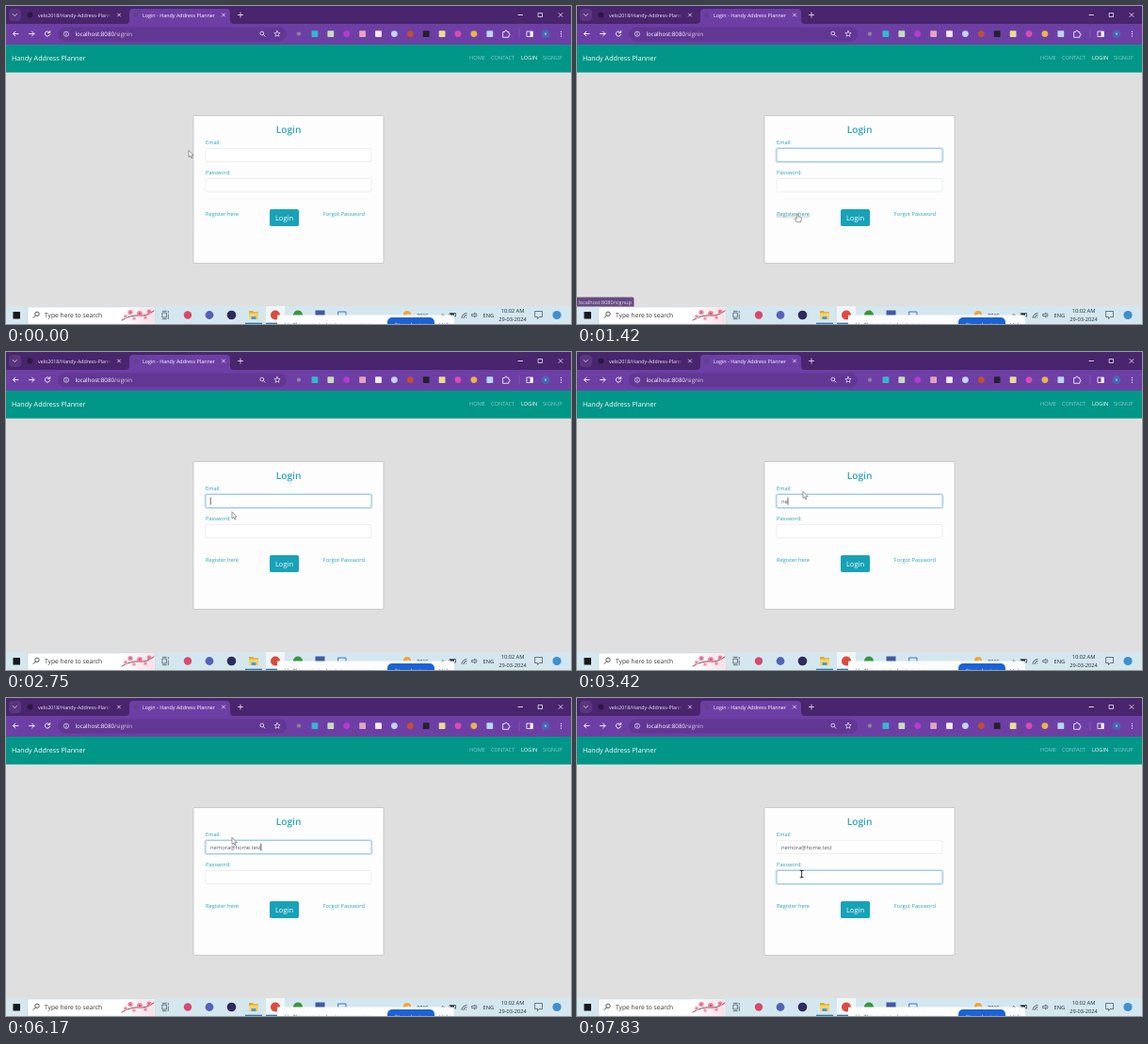
Recreate the animation shown at these times as an HTML page. Size 600 px wide and 338 px high, loop 8 s.

```html
<!DOCTYPE html>
<html lang="en">
<head>
<meta charset="utf-8">
<title>Login</title>
<style>
html, body { margin: 0; width: 100%; height: 100%; overflow: hidden; background: #e0dfdf; }
svg { display: block; width: 600px; height: 338px; overflow: hidden; }
text { font-family: "Open Sans", "Noto Sans", sans-serif; text-rendering: geometricPrecision; white-space: pre; }
.line { fill: none; stroke-linecap: round; stroke-linejoin: round; }
</style>
</head>
<body>
<svg id="stage" viewBox="0 0 600 338" xmlns="http://www.w3.org/2000/svg">
  <defs>
    <linearGradient id="fade" x1="0" x2="1">
      <stop offset="0" stop-color="#48256c" stop-opacity="0"/>
      <stop offset="1" stop-color="#48256c"/>
    </linearGradient>
    <linearGradient id="sky" x1="0" x2="1">
      <stop offset="0" stop-color="#fff"/>
      <stop offset="1" stop-color="#f6dfe6"/>
    </linearGradient>
    <clipPath id="tabClip"><rect x="34" y="2" width="78" height="15"/></clipPath>
    <clipPath id="titleClip"><rect x="144" y="2" width="82" height="15"/></clipPath>
  </defs>
  <g id="browser"></g>
  <g id="page"></g>
  <g id="taskbar"></g>
  <g id="status">
    <path d="M0 309.500H59q1.500 0 1.500 1.500V319.500H0Z" fill="#664a80"/>
    <text x="1.500" y="316.500" font-size="5.500" fill="#e6dcee">localhost:8080/signup</text>
  </g>
  <g id="pointer">
    <path id="arrow" d="M0 0V7.200L1.700 5.700L2.900 8.300L4 7.800L2.900 5.300H5.200Z" fill="#fff" stroke="#555" stroke-width=".6" stroke-linejoin="round"/>
    <path id="hand" d="M-.8 .6Q0 -.5 .8 .6V3.300L3.300 3.900Q4.500 4.200 4.400 5.600L3.600 9.200H-.6L-2.900 5.900Q-2.700 4.800 -1.700 5.300L-.8 6.100Z" fill="#fff" stroke="#555" stroke-width=".6" stroke-linejoin="round"/>
    <path id="beam" class="line" d="M-1.500 -3.600H1.500M0 -3.600V3.600M-1.500 3.600H1.500" stroke="#222" stroke-width=".9"/>
  </g>
</svg>
<script>
const $ = id => document.getElementById(id);
const rect = (x, y, w, h, fill, r = 0, extra = '') =>
  `<rect x="${x}" y="${y}" width="${w}" height="${h}" rx="${r}" fill="${fill}" ${extra}/>`;
const dot = (x, y, r, fill, extra = '') =>
  `<circle cx="${x}" cy="${y}" r="${r}" fill="${fill}" ${extra}/>`;
const line = (d, color, w = 0.8, extra = '') =>
  `<path class="line" d="${d}" stroke="${color}" stroke-width="${w}" ${extra}/>`;
const label = (x, y, size, fill, str, extra = '') =>
  `<text x="${x}" y="${y}" font-size="${size}" fill="${fill}" ${extra}>${str}</text>`;

const APP = 'Handy Address Planner';
const EMAIL = 'nemora@home.test';
const TEAL = '#2ba5b9', BUTTON = '#17a2b8', HOVER = '#3f8d9d';
const PALE = '#f1e8f8', INK = '#222c33', STRIP = '#48256c', BAR = '#6d3fa5';

function browser() {
  const cross = (x, y, s) => line(`M${x - s} ${y - s}l${2 * s} ${2 * s}m0 ${-2 * s}l${-2 * s} ${2 * s}`, PALE);
  const tools = ['#8d8299', '#35b7cf', '#c6dcb9', '#b43ccf', '#e5a4bd', '#f2e9ec', '#c4d3ee',
    '#c2502f', '#26212b', '#e9dc92', '#d94bb4', '#e9b44a', '#b9d6f2'];
  const square = [1, 2, 4, 5, 8, 9, 12];
  let s = rect(0, 0, 600, 20, STRIP) + rect(0, 19, 600, 22, BAR);
  s += rect(3, 3, 13, 13, '#5a3580', 4) + line('M7.300 8.600l2 2l2-2', PALE);
  s += dot(25.5, 9.5, 3, '#2c1840');
  s += label(34, 11.5, 5.3, PALE, 'velo2018/' + APP.replaceAll(' ', '-'), 'clip-path="url(#tabClip)"');
  s += rect(104, 3, 8, 14, 'url(#fade)') + cross(120, 9.5, 1.5);
  s += `<path d="M127 19q4 0 4-4V7q0-4 4-4h99q4 0 4 4v8q0 4 4 4Z" fill="${BAR}"/>`;
  s += dot(138, 9.5, 2.4, '#5d4484');
  s += label(145, 11.5, 5.4, '#fff', 'Login - ' + APP, 'clip-path="url(#titleClip)"');
  s += cross(231, 9.5, 1.5) + line('M246.500 9.500h5m-2.500-2.500v5', PALE);
  s += line('M544 9.500h4.500', '#fff') + line('M565.500 7.500h4v4h-4Z', '#fff', 0.7) + cross(589, 9.5, 2);

  s += line('M13 29.500H7.500m2.400-2.400l-2.400 2.400l2.400 2.400', '#fff', 0.9);
  s += line('M24.500 29.500H30m-2.400-2.400l2.400 2.400l-2.400 2.400', '#fff', 0.9);
  s += line('M46.300 28.300a2.600 2.600 0 1 0 .2 2M46.700 26.500v2h-2', '#fff', 0.9);
  s += rect(55, 22.5, 243, 15, '#613793', 7.5);
  s += dot(64, 29.7, 2.6, 'none', `stroke="${PALE}" stroke-width=".7"`) + line('M64 29.500v1.500M64 28.200v.1', PALE, 0.7);
  s += label(73.500, 31.900, 6.15, '#fff', 'localhost:8080<tspan fill="#dccbea">/signin</tspan>');
  s += dot(271.8, 29, 1.9, 'none', `stroke="${PALE}" stroke-width=".8"`) + line('M273.300 30.500l1.700 1.700', PALE);
  let star = '';
  for (let i = 0; i < 10; i++) {
    const r = i % 2 ? 1.5 : 3.3, a = i * Math.PI / 5;
    star += (i ? 'L' : 'M') + (288 + r * Math.sin(a)).toFixed(2) + ' ' + (29.6 - r * Math.cos(a)).toFixed(2);
  }
  s += line(star + 'Z', PALE, 0.7);
  tools.forEach((c, i) => {
    const x = 311 + i * 16.9;
    s += square.includes(i) ? rect(x - 3.4, 26.2, 6.8, 6.8, c, 0.8) : dot(x, 29.6, i ? 3.4 : 2.2, c);
  });
  s += line('M528 27.500h1.700q0-1.500 1.300-1.500t1.300 1.500h1.500v1.700q1.300 0 1.300 1.200t-1.300 1.200v1.700h-5.800Z', '#fff', 0.8);
  s += line('M545 25v9', '#8f65b6', 0.6);
  s += line('M553.300 27h6v5.500h-6Z', '#fff') + rect(556.6, 27, 2.7, 5.5, '#fff');
  s += dot(573, 29.7, 4.4, '#4568b0') + label(573, 31.3, 5, '#fff', 'v', 'text-anchor="middle"');
  for (const y of [27.3, 29.7, 32.1]) s += dot(589.5, y, 0.65, '#fff');
  return s;
}

function page() {
  const input = (id, y) =>
    rect(211.2, y - 0.8, 177.6, 15.6, 'none', 2, `id="${id}Ring" stroke="#d3e6f8" stroke-width="1.400"`) +
    rect(212, y, 176, 14, '#fff', 1.4, 'stroke="#dadee2" stroke-width=".5"') +
    rect(212, y, 176, 14, 'none', 1.4, `id="${id}Edge" stroke="#8fc2e8" stroke-width=".8"`);
  let s = rect(0, 41, 600, 30, '#009688') + rect(0, 70.6, 600, 249, '#e0dfdf');
  s += label(6, 57.700, 7.2, '#fff', APP, 'font-weight="500"');
  [[492, 'HOME'], [515, 'CONTACT'], [547, 'LOGIN'], [570, 'SIGNUP']].forEach(([x, w]) => {
    s += label(x, 57.200, 5.7, w === 'LOGIN' ? '#fff' : '#88cfc7', w);
  });
  s += rect(199, 116.4, 202, 157, '#fdfdfd', 0.8, 'stroke="#b8b8b8" stroke-width=".7"');
  s += label(300, 134.800, 10.2, TEAL, 'Login', 'text-anchor="middle" font-weight="600"');
  s += label(212, 146.600, 5.65, TEAL, 'Email:') + input('email', 151.5);
  s += label(212, 179, 5.65, TEAL, 'Password:') + input('pass', 183.5);
  s += label(217, 160.700, 5.8, '#555d64', '', 'id="typed"');
  s += rect(217, 154.5, 0.7, 8, '#222', 0, 'id="caret"');
  s += label(212, 223, 5.7, TEAL, 'Register here', 'id="link"');
  s += line('M212 224h35', HOVER, 0.4, 'id="under"');
  s += label(336.800, 223, 5.7, TEAL, 'Forgot Password');
  s += rect(280, 216, 31, 18, BUTTON, 1.8);
  s += label(295.5, 228, 7.5, '#fff', 'Login', 'text-anchor="middle"');
  return s;
}

function taskbar() {
  let s = rect(0, 319, 600, 19, '#d5e7ee');
  s += rect(7.5, 325, 7.5, 7.5, '#15191c');
  s += rect(23, 320, 135, 18, '#fff', 0, 'stroke="#c3cdd2" stroke-width=".5"');
  s += dot(33, 327.3, 2.2, 'none', `stroke="${INK}" stroke-width=".8"`) + line('M31.400 329l-2.400 2.500', INK);
  s += label(41, 331.200, 6.7, '#333', 'Type here to search');
  // blossom picture in the search box
  s += rect(122, 320.5, 35.5, 17, 'url(#sky)') + line('M123 334q10-6 18-5t16-5', '#80515a', 1);
  [[127, 330, 2.2], [132, 325.5, 2.6], [136, 332, 2], [142, 327, 3], [148, 331, 2.2], [152, 325, 2.4]].forEach(([x, y, r], i) => {
    s += dot(x, y, r, i % 2 ? '#e98aa5' : '#f2b4c4') + dot(x, y, r * 0.3, '#b93e5f');
  });
  s += line('M166.300 326h4v5h-4ZM166.300 324.300h4M166.300 332.700h4M172.300 324.500v1.500M172.300 328v4.500', INK, 0.6);
  s += dot(193, 328.5, 4.2, '#d8496d') + dot(216, 328.5, 4.4, '#5263b8') + dot(239.5, 328.5, 4.8, '#30295c');
  s += '<path d="M258 324h4l1 1.300h5v7.700h-10Z" fill="#e5a92e"/>' + rect(258, 326.5, 10, 6.5, '#f8d366', 0.5) + rect(260.5, 330, 5, 3, '#4a9bd5');
  s += rect(276, 319, 20, 19, '#f0f6f8') + dot(286, 328.5, 5, '#dd4b3e');
  s += rect(254, 336.7, 18, 1.3, '#2a78b8') + rect(276, 336.7, 20, 1.3, '#2a78b8');
  s += dot(310, 328.5, 5, '#3b963f') + rect(328.5, 323.5, 10, 10, '#4259a0');
  s += line('M353 325h8v8h-8Z', '#3c78c6', 1);
  s += dot(426, 328, 4, '#f2a436') + '<path d="M422 331q0-2.500 3-2.500q3-2.500 4.500 .6q2.500 .2 2.500 1.900Z" fill="#e9eef0"/>';
  s += label(436, 330.800, 5.7, INK, '30°C');
  s += line('M462 329.500l2-2l2 2', INK) + line('M471.500 326.500h6v3.500h-6Z', INK, 0.7) + rect(472, 327, 4, 2.6, INK);
  s += line('M484 331.500a5 5 0 0 1 5-5M486 331.500a3 3 0 0 1 3-3M488.500 331v.2', INK, 0.7);
  s += line('M495 327.500h1.300l1.700-1.500v5l-1.700-1.500h-1.300ZM499.500 327q1.200 1.500 0 3', INK, 0.6);
  s += label(506.500, 330.800, 5.7, INK, 'ENG');
  s += label(538, 325.900, 5.7, INK, '10:02 AM', 'text-anchor="middle"');
  s += label(538, 335.200, 5.7, INK, '29-03-2024', 'text-anchor="middle"');
  s += line('M562 324.500h7.500v6h-3l-2 2v-2h-2.500Z', INK, 0.6) + dot(585, 328.5, 4.6, '#3f8fd0');
  // screen sharing notice, cut off by the stage edge
  s += rect(288, 328.5, 188, 14, '#fdfdfd', 1) + label(295, 341.300, 5.8, '#555', '||  This page is sharing your screen.');
  s += rect(405, 331, 50, 14, '#1a62d6', 5) + label(430, 341.200, 5.8, '#fff', 'Stop sharing', 'text-anchor="middle"');
  s += label(460, 341.200, 5.8, '#1a62d6', 'Hide');
  return s;
}

$('browser').innerHTML = browser();
$('page').innerHTML = page();
$('taskbar').innerHTML = taskbar();

const LOOP = 8000, BLINK = 480;
const EMAIL_CLICK = 500, PASS_CLICK = 7345;
const KEYS = [3250, 3415, 3580, 3830, 4000, 4165, 4580, 4910, 5000, 5165, 5415, 5500, 5600, 5740, 5830, 5990];
// time, x, y
const PATH = [
  [80, 194, 153.5], [420, 232, 158], [560, 232, 158], [830, 234, 220.5], [1670, 234, 220.5],
  [2080, 240, 182], [2580, 240, 182], [3000, 240, 148.3], [6580, 240, 148.3], [7250, 238.6, 187]
];

function pointerAt(t) {
  const i = PATH.findIndex(p => p[0] > t);
  if (i === 0) return PATH[0].slice(1);
  if (i < 0) return PATH.at(-1).slice(1);
  const a = PATH[i - 1], b = PATH[i];
  const u = (t - a[0]) / (b[0] - a[0]), e = u * u * (3 - 2 * u);
  return [a[1] + (b[1] - a[1]) * e, a[2] + (b[2] - a[2]) * e];
}

const show = (id, on) => $(id).setAttribute('opacity', +on);
const ramp = (t, start, len) => Math.min(1, Math.max(0, (t - start) / len));

function draw(t) {
  const [x, y] = pointerAt(t);
  const inField = x > 212 && x < 388 && ((y > 151.5 && y < 165.5) || (y > 183.5 && y < 197.5));
  const onLink = x > 212 && x < 247 && y > 216 && y < 225;
  $('pointer').setAttribute('transform', `translate(${x.toFixed(2)} ${y.toFixed(2)})`);
  show('beam', inField);
  show('hand', onLink);
  show('arrow', !inField && !onLink);

  show('under', onLink);
  $('link').setAttribute('fill', onLink ? HOVER : TEAL);
  show('status', ramp(t, 940, 80) * (1 - ramp(t, 1850, 120)));

  const pass = ramp(t, PASS_CLICK, 150), email = ramp(t, EMAIL_CLICK, 150) * (1 - pass);
  for (const part of ['Ring', 'Edge']) {
    show('email' + part, email);
    show('pass' + part, pass);
  }

  const count = KEYS.filter(k => k <= t).length, inPass = t >= PASS_CLICK;
  const typed = $('typed'), str = EMAIL.slice(0, count);
  if (typed.textContent !== str) typed.textContent = str;
  const since = t - (inPass ? PASS_CLICK : count ? KEYS[count - 1] : EMAIL_CLICK);
  const width = inPass || !count ? 0 : typed.getComputedTextLength();
  $('caret').setAttribute('x', 216.8 + width);
  $('caret').setAttribute('y', inPass ? 186.6 : 154.5);
  show('caret', since >= 0 && since % (2 * BLINK) < BLINK);
}

const start = performance.now();
function tick() {
  draw((performance.now() - start) % LOOP);
  requestAnimationFrame(tick);
}
tick();
</script>
</body>
</html>
```
